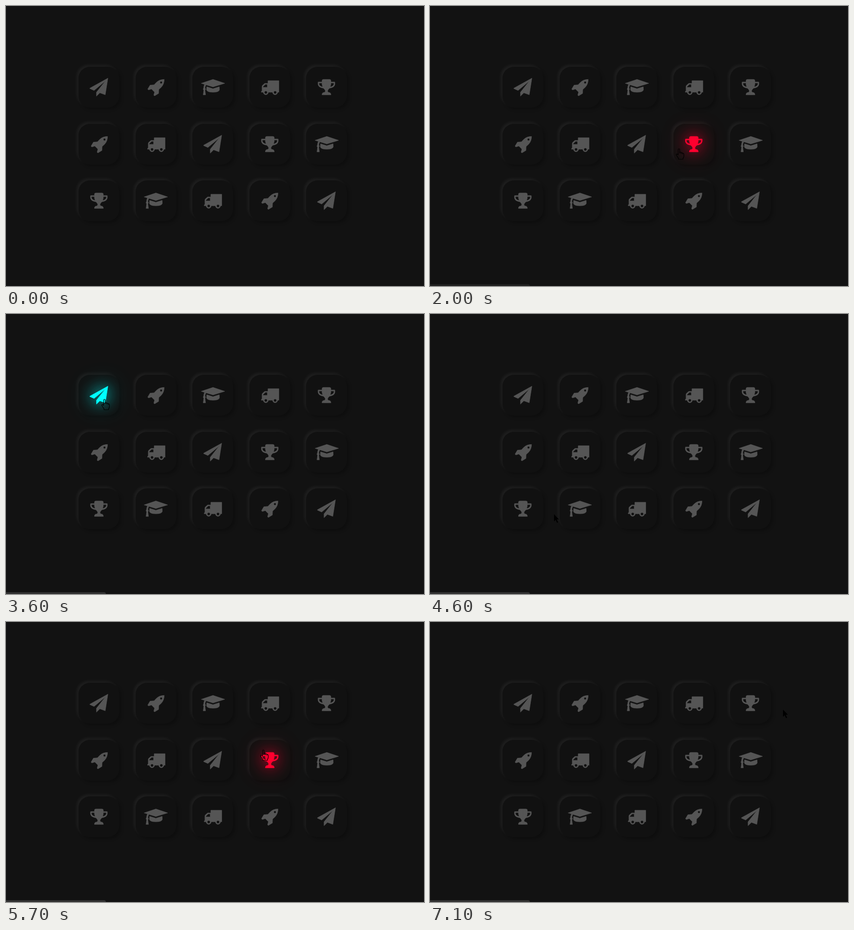
Recreate the animation shown at these times as an HTML page. Size 900 by 604 pixels, loop 7.2 s.

```html
<!DOCTYPE html>
<html lang="en">
<head>
<meta charset="utf-8">
<title>Glowing icon tiles</title>
<style>
html, body { margin: 0; width: 100%; height: 100%; overflow: hidden; background: #121212; }
.tile {
  position: absolute; width: 88px; height: 88px; border-radius: 25px;
  background: #111; color: #555;
  box-shadow: -4px -4px 6px rgba(255,255,255,.055), 4px 4px 6px rgba(0,0,0,.25);
}
.icon {
  position: absolute; width: 40px; height: 40px; overflow: visible;
  fill: currentColor; fill-rule: evenodd; stroke: currentColor; stroke-width: .8; stroke-linejoin: round;
}
.ring { fill: none; stroke-width: 2.9; }
.on { color: var(--glow); }
.on + .icon {
  color: var(--glow);
  filter: drop-shadow(0 0 15px color-mix(in srgb, var(--glow) 70%, transparent))
          drop-shadow(0 0 26px color-mix(in srgb, var(--glow) 40%, transparent));
}
.tile + .icon { color: #555; }
.tile.on + .icon { color: var(--glow); }
#bar { position: absolute; left: 0; top: 600px; width: 215px; height: 4px; background: #333; border-radius: 0 4px 0 0; }
#cursor { position: absolute; left: 0; top: 0; overflow: visible; }
</style>
</head>
<body>
<div id="bar"></div>
<svg id="cursor" width="1" height="1">
  <path id="arrow" d="M0 0V15.5L3.5 12 6.5 18.5 9 17.4 6 11H10.5Z"/>
  <path id="hand" fill="none" stroke="#000" stroke-width="1.2" d="M-1.6 13V1.6a1.6 1.6 0 0 1 3.2 0V10M1.6 7.6q3.2-1.2 3.2 1V11M4.8 8.6q3-.8 3 1V12M7.8 9.8q2.8-.6 2.8 2V16q0 2.6-1.8 4.4V22.5H-1V20.4L-5.4 14q-1-2 .6-2.6 1.6-.3 3.2 2"/>
</svg>
<script>
const shape = (d, attrs = '') => `<path d="${d}" ${attrs}/>`;
const hole = (x, y, r) => `M${x} ${y - r}a${r} ${r} 0 1 0 .1 0Z`;
const mirrored = (d, attrs = '') => shape(d, attrs) + shape(d, attrs + ' transform="matrix(-1 0 0 1 40 0)"');
const wheelArch = 'a5.4 5.4 0 0 1-10.8 0';

// Each icon: glyph width and its drawing on a 40 px em
const icons = {
  plane: [40, shape('M39.4.7 33.7 36.5 22.1 32.3 14.8 39.4V31L34.2 6.4 9.7 27.2 .6 23.2V22.2Z')],
  rocket: [37, shape('M36.7 3.3Q36.5 14 29.8 20.8L25 25 24.6 33.6 16 38.8 14.2 37.5 15.9 30.7 9.3 24.1 2.7 26 1.2 24.2 6.2 15.8 15 14.9 19 10.5Q26 3.3 36.7 3.3Z' + hole(30, 10, 2.5))],
  cap: [51, shape('M25.7 3.3 51 11.8 25.7 19.6 .4 11.8Z') +
    shape('M39.2 19.2 39.6 25.7Q38.5 31 25.7 31T11.8 25.7L12.2 19.2 25.7 23.4Z') +
    shape('M10.5 15.4Q8.6 18 8.4 22 11 24.3 8.4 26.7L9.7 36.7H4.6L5.9 26.7Q3.3 24.3 5.6 22 5.6 18 7.6 14Z')],
  truck: [40, shape(`M16 6.1H39.6V31H36.8${wheelArch}H16.8${wheelArch}H1.8V29.2L3.2 28V19Q3.2 17.2 4.4 16L9 11.9H16Z` +
    'M5.3 20.4H14.7V13.9H10.4L5.3 19Z' + hole(11.4, 31.4, 3.2) + hole(31.4, 31.4, 3.2))],
  trophy: [40, mirrored('M20 10H37.1V13.5Q36 21.5 20 21.5', 'class="ring"') +
    mirrored('M20 3.3H26.4Q29.6 3.3 29.6 6.5V11Q29.6 20 24.4 24.6 22.5 26.5 22.5 28.6 22.5 31.5 25.7 31.6 29.6 32 29.6 36.7H20Z')]
};
const rows = [
  ['#00ffff', 'plane rocket cap truck trophy'],
  ['#ff002f', 'rocket truck plane trophy cap'],
  ['#00ff00', 'trophy cap truck rocket plane']
];
const LOOP = 7200, STEP = 100, ENTER = 1600, SIZE = 88, PITCH = 122.5;
// Turning points of the pointer: time, x, y
const route = [
  [ENTER, 508, 560], [2000, 536, 308], [2800, 346, 220], [3400, 212, 184], [3600, 212, 184], [4300, 215, 368],
  [4600, 267, 432], [5100, 445, 431], [5700, 554, 276], [6300, 605, 186], [7100, 760, 189]
];
const $ = id => document.getElementById(id);
const bar = $('bar'), cursor = $('cursor'), arrow = $('arrow'), hand = $('hand');

const tiles = rows.flatMap(([glow, names], r) => names.split(' ').map((name, c) => {
  const x = 156 + PITCH * c, y = Math.round(131 + PITCH * r), [width, drawing] = icons[name];
  const left = Math.round(x + (SIZE - width) / 2);
  bar.insertAdjacentHTML('beforebegin',
    `<div class="tile" style="left:${x}px;top:${y}px"></div>
     <svg class="icon" style="left:${left}px;top:${y + 24}px;--glow:${glow}">${drawing}</svg>`);
  return { el: bar.previousElementSibling.previousElementSibling, x, y };
}));

function pointerAt(t) {
  const i = Math.max(1, route.findIndex(p => p[0] >= t));
  const [t0, x0, y0] = route[i - 1], [t1, x1, y1] = route[i];
  const k = (t - t0) / (t1 - t0);
  return [x0 + (x1 - x0) * k, y0 + (y1 - y0) * k];
}

function draw(now) {
  const t = Math.floor(now % LOOP / STEP) * STEP;
  const shown = t >= ENTER;
  const [px, py] = shown ? pointerAt(t) : [-99, -99];
  let over = false;
  for (const { el, x, y } of tiles) {
    const on = px >= x && px <= x + SIZE && py >= y && py <= y + SIZE + 1;
    el.classList.toggle('on', on);
    over ||= on;
  }
  cursor.style.transform = `translate(${Math.round(px)}px, ${Math.round(py)}px)`;
  hand.style.display = over ? '' : 'none';
  arrow.style.display = over ? 'none' : '';
  bar.style.opacity = shown ? 1 - Math.exp((ENTER - t) / 700) : 0;
  requestAnimationFrame(draw);
}
requestAnimationFrame(draw);
</script>
</body>
</html>
```
